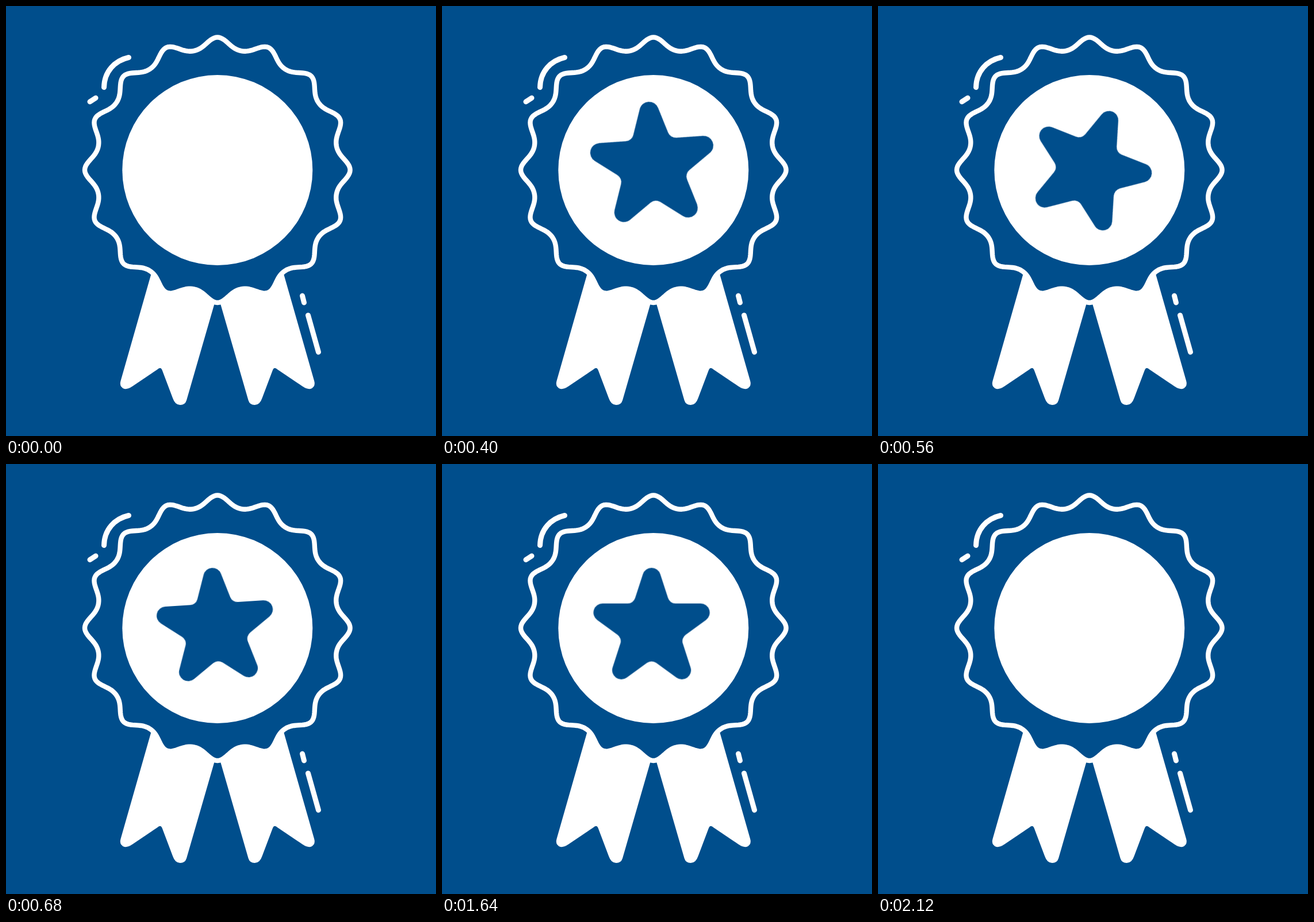
These frames come from a looping animation (748x748 px, 2.2 s). An HTML page:

```html
<!DOCTYPE html>
<html lang="en">
<head>
<meta charset="utf-8">
<title>Award ribbon</title>
<style>
  html, body { margin: 0; width: 100%; height: 100%; overflow: hidden; background: #004e8c; }
  svg { display: block; width: 100%; height: 100%; }
  .white { fill: #fff; }
  .blue { fill: #004e8c; }
  .line { fill: none; stroke: #fff; stroke-width: 9; stroke-linecap: round; }
  #rosette { stroke: #fff; stroke-width: 8.4; stroke-linejoin: round; }
  #star { transform-origin: 0 0; }
</style>
</head>
<body>
<svg viewBox="0 0 748 748">
  <defs>
    <path id="tail" d="M260 440 L199.5 652 Q196.5 663 206 666 Q212 667 220 661.5 L263 632.5
      Q269 627 271.5 633 L290 682 Q294 694 303 694 Q311.5 694 314 686 L362 520 L370 490 Z"/>
  </defs>
  <use href="#tail" class="white"/>
  <use href="#tail" class="white" transform="matrix(-1 0 0 1 735.6 0)"/>
  <path id="rosette" class="blue"/>
  <circle class="white" cx="367.8" cy="285.5" r="165.5"/>
  <path id="star" class="blue"/>
  <g class="line">
    <path d="M213.5 89.5 C189 95 171 114 170.5 141.5"/>
    <path d="M146 166.5 L156 160"/>
    <path d="M515.5 504 L518.5 516"/>
    <path d="M525.5 538 L543.5 602"/>
  </g>
</svg>
<script>
const LOOP = 2200, STEP = 40;
const PIVOT = { x: 364.6, y: 282 };
const rad = deg => deg * Math.PI / 180;

// Angles run clockwise from straight up.
const polar = (x, y, r, deg) => [x + r * Math.sin(rad(deg)), y - r * Math.cos(rad(deg))];
const text = point => point.map(n => n.toFixed(2)).join(' ');

// Sixteen waves; the second harmonic sharpens the crests and widens the valleys.
function rosettePath() {
  const points = Array.from({ length: 480 }, (_, i) => {
    const deg = i * 0.75, wave = rad(16 * deg);
    return text(polar(367.8, 285.2, 220 + 9.8 * Math.cos(wave) + Math.cos(2 * wave), deg));
  });
  return `M${points.join('L')}Z`;
}

function starPath() {
  const centreY = 4, tipR = 85.8, tipRound = 15.2, notchRound = 13;
  const edge = tipR * Math.cos(rad(72)) + tipRound;
  const notchR = edge / Math.cos(rad(36)) + notchRound / Math.sin(rad(54));
  let d = '';
  for (let a = 0; a < 360; a += 72) {
    const tip = polar(0, centreY, tipR, a);
    const notch = polar(0, centreY, notchR, a + 36);
    d += `${a ? 'L' : 'M'}${text(polar(...tip, tipRound, a - 72))}`
      + `A${tipRound} ${tipRound} 0 0 1 ${text(polar(...tip, tipRound, a + 72))}`
      + `L${text(polar(...notch, notchRound, a + 252))}`
      + `A${notchRound} ${notchRound} 0 0 0 ${text(polar(...notch, notchRound, a + 180))}`;
  }
  return d + 'Z';
}

const scaleKeys = [[90, 0], [420, 1.12], [560, 1.075], [840, 1], [1606, 1], [1720, 1.21], [2120, 0]];
const turnKeys = [[80, -360], [400, -148], [560, -50.5], [640, -11], [700, 0]];
const linear = u => u;
const smooth = u => u * u * (3 - 2 * u);

function valueAt(keys, time, ease) {
  const next = keys.findIndex(([t]) => t > time);
  if (next === 0) return keys[0][1];
  if (next < 0) return keys[keys.length - 1][1];
  const [t0, v0] = keys[next - 1], [t1, v1] = keys[next];
  return v0 + (v1 - v0) * ease((time - t0) / (t1 - t0));
}

function pose(time) {
  const scale = valueAt(scaleKeys, time, smooth);
  const turn = valueAt(turnKeys, time, linear);
  return `translate(${PIVOT.x}px, ${PIVOT.y}px) rotate(${turn}deg) scale(${scale})`;
}

const star = document.getElementById('star');
star.setAttribute('d', starPath());
document.getElementById('rosette').setAttribute('d', rosettePath());

const keyframes = Array.from({ length: LOOP / STEP + 1 }, (_, i) => ({
  offset: i * STEP / LOOP,
  transform: pose(i * STEP),
  easing: 'step-end'
}));
star.animate(keyframes, { duration: LOOP, iterations: Infinity });
</script>
</body>
</html>
```
